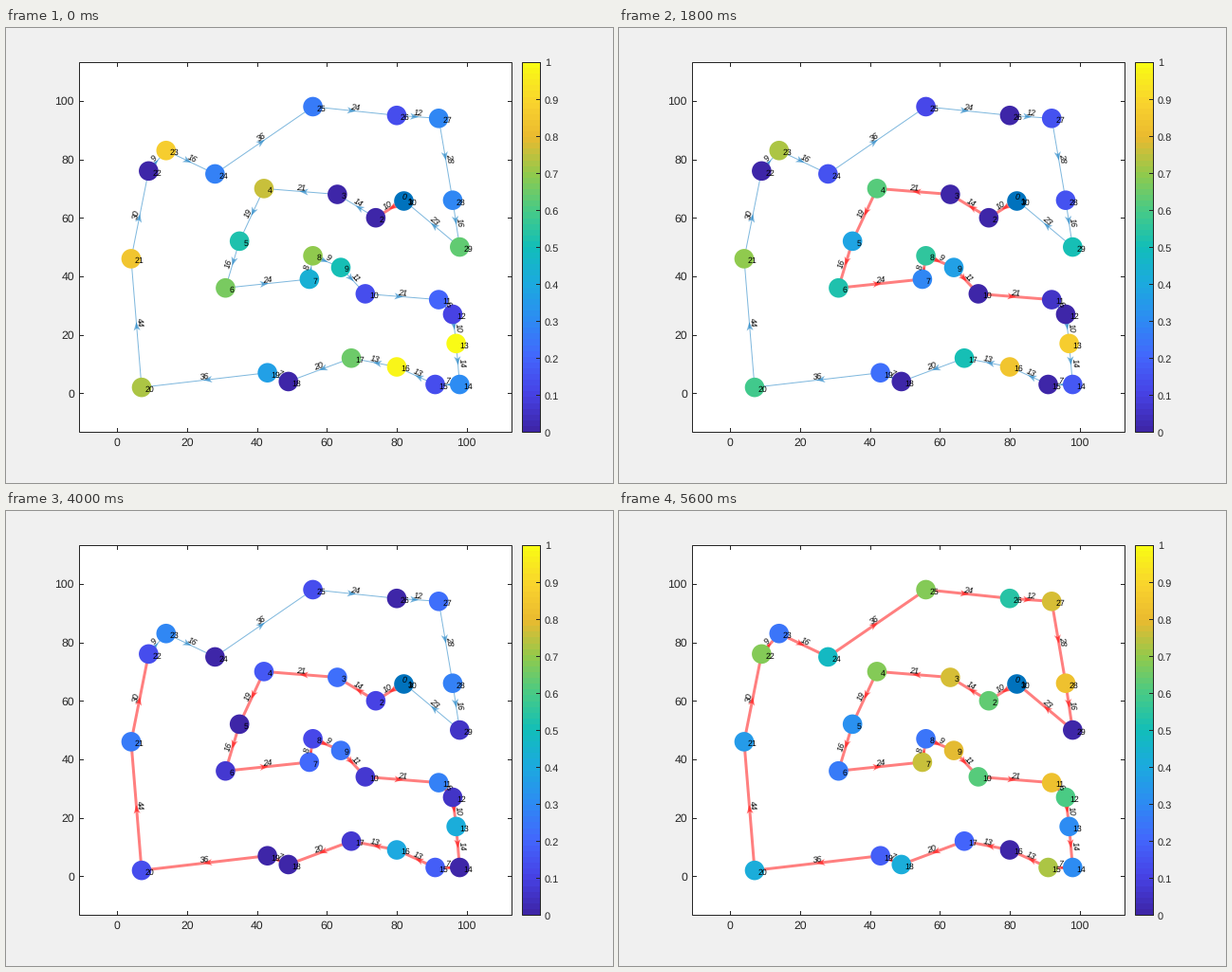
Recreate the animation shown at these times as a matplotlib script. Size 640 px wide and 480 px high, loop 5800 ms.

```python
import numpy as np
import matplotlib.pyplot as plt
from matplotlib.animation import FuncAnimation
from matplotlib.collections import LineCollection, PolyCollection
from matplotlib.colors import LinearSegmentedColormap
from matplotlib.patches import Rectangle

W, H, DPI = 640, 480, 100
PX = 72 / DPI
INK = (0.15, 0.15, 0.15)
BLUE = (0, 0.447, 0.741)
RED = (1, 0, 0)
plt.rcParams["text.hinting"] = "none"

# Stops in visiting order: x, y, percent filled at the start and at the end
STOPS = np.array([
    (82, 66, 0, 0), (74, 60, 0, 64), (63, 68, 0, 77), (42, 70, 75, 68),
    (35, 52, 52, 32), (31, 36, 66, 25), (55, 39, 43, 75), (56, 47, 70, 24),
    (64, 43, 50, 79), (71, 34, 13, 62), (92, 32, 20, 82), (96, 27, 10, 60),
    (97, 17, 100, 30), (98, 3, 31, 30), (91, 3, 14, 72), (80, 9, 98, 0),
    (67, 12, 65, 20), (49, 4, 0, 42), (43, 7, 36, 18), (7, 2, 72, 42),
    (4, 46, 84, 35), (9, 76, 0, 68), (14, 83, 87, 24), (28, 75, 28, 47),
    (56, 98, 25, 68), (80, 95, 14, 54), (92, 94, 29, 77), (96, 66, 29, 82),
    (98, 50, 64, 0)])
FRAMES = len(STOPS)

CMAP = LinearSegmentedColormap.from_list("levels", [
    "#3e26a8", "#4743e7", "#4367fd", "#2d8cf3", "#1caadf", "#12beb9",
    "#48cb86", "#91ca4d", "#eaba30", "#fad42e", "#f9fb15"], N=64)


def smooth(u):
    u = np.clip(u, 0, 1)
    return u * u * (3 - 2 * u)


def level(k):
    """Stops drain ever faster, then refill towards their final level."""
    start, end = STOPS[1:, 2:].T / 100
    last = FRAMES - 1
    drain = start - (k / (last - 1)) ** 1.8
    refill = end - 0.9 * smooth((last - k) / 14)
    return np.clip(np.maximum(drain, refill), 0, 1)


def to_px(p):
    return np.array([117.2, 385.3]) + np.asarray(p) * [3.685, -3.085]


def label(x, y, s, size, ha="center", color=INK, **kw):
    ax.text(x, y, s, fontsize=size * PX, ha=ha, va="center_baseline",
            color=color, family="Liberation Sans", **kw)


def line(x0, y0, x1, y1):
    ax.plot([x0, x1], [y0, y1], color=INK, lw=PX, zorder=1)


def box(x, y, w, h, **kw):
    ax.add_patch(Rectangle((x, y), w, h, ec=INK, lw=PX, **kw))


def arrow(a, b):
    """Notched head with its tip near the middle of the edge."""
    d = (b - a) / np.hypot(*(b - a))
    n = np.array([-d[1], d[0]])
    tip = (a + b) / 2 + d
    return [tip, tip - 9 * d + 3.5 * n, tip - 6.5 * d, tip - 9 * d - 3.5 * n]


fig = plt.figure(figsize=(W / DPI, H / DPI), dpi=DPI, facecolor="#f0f0f0")
ax = fig.add_axes([0, 0, 1, 1])
ax.axis("off")

# Plot box with inward ticks
L, R, T, B = 77, 533, 36, 426
box(L, T, R - L, B - T, fc="white", zorder=0)
for v in range(0, 101, 20):
    x, y = to_px((v, v))
    line(x, B, x, B - 4)
    line(x, T, x, T + 4)
    line(L, y, L + 4, y)
    line(R, y, R - 4, y)
    label(x, 437, v, 12.3)
    label(72, y, v, 12.3, ha="right")

# Colour bar
CL, CR = 544, 563
ax.imshow(np.linspace(1, 0, 64)[:, None], cmap=CMAP, vmin=0, vmax=1,
          extent=(CL, CR, B, T), aspect="auto",
          interpolation="nearest", zorder=0)
ax.set(xlim=(0, W), ylim=(H, 0))
box(CL, T, CR - CL, B - T, fill=False, zorder=1)
for v in np.linspace(0, 1, 11):
    y = B - v * (B - T)
    line(CR, y, CR - 4, y)
    label(568, y + 0.5, f"{v:.1g}", 11, ha="left")

# Closed route
pos = to_px(STOPS[:, :2])
loop = np.vstack([pos, pos[:1]])
legs = list(zip(loop[:-1], loop[1:]))
edges = LineCollection(legs, zorder=2)
heads = PolyCollection([arrow(a, b) for a, b in legs], lw=0, zorder=3)
ax.add_collection(edges)
ax.add_collection(heads)

size = (20.6 * PX) ** 2
nodes = ax.scatter(*pos[1:].T, s=size, c=level(0), cmap=CMAP,
                   vmin=0, vmax=1, lw=0, zorder=4)
ax.scatter(*pos[0], s=size, color=[BLUE], lw=0, zorder=5)

note = dict(size=8.8, color="black", zorder=6)
for i, (x, y) in enumerate(loop, 1):
    label(x + 4, y + 1.5, i, ha="left", **note)

route = np.vstack([STOPS, STOPS[:1]])[:, :2]
lengths = np.hypot(*np.diff(route, axis=0).T)
for (a, b), d in zip(legs, lengths):
    if a[0] > b[0]:
        a, b = b, a
    dx, dy = (b - a) / np.hypot(*(b - a))
    x, y = (a + b) / 2 + 4.6 * np.array([dy, -dx])
    label(x, y, f"{d:.0f}", style="italic", rotation_mode="anchor",
          rotation=np.degrees(np.arctan2(-dy, dx)), **note)
label(pos[0, 0] + 0.8, pos[0, 1] - 4.3, "0", style="italic", **note)


def update(k):
    done = np.arange(FRAMES) <= k
    base = [RED if d else BLUE for d in done]
    edges.set_color([(*c, 0.5) for c in base])
    edges.set_linewidth(np.where(done, 3, 1) * PX)
    heads.set_facecolor([(*c, 0.55) for c in base])
    nodes.set_array(level(k))
    return edges, heads, nodes


anim = FuncAnimation(fig, update, frames=FRAMES, interval=200,
                     repeat=True, repeat_delay=0)
plt.show()
```
